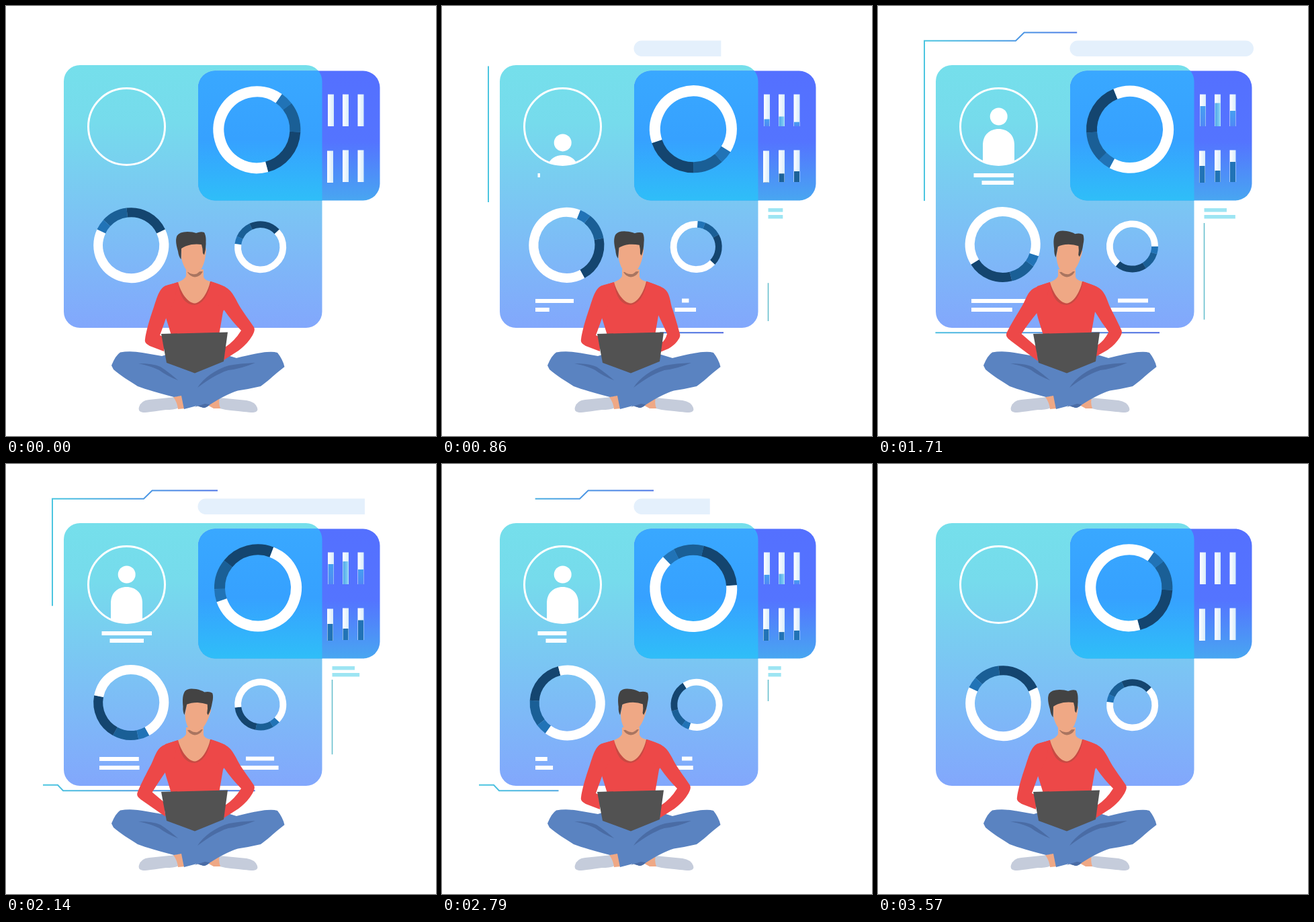
An HTML page that plays this animation: 640x640 px, repeating every 3640 ms.

```html
<!DOCTYPE html>
<html lang="en">
<head>
<meta charset="utf-8">
<title>Dashboard</title>
<style>
html, body { margin: 0; width: 100%; height: 100%; overflow: hidden; background: #fff; }
svg { display: block; width: 100vw; height: 100vh; }
.line { fill: none; stroke-width: 2; }
</style>
</head>
<body>
<svg id="stage" viewBox="0 0 640 640">
  <defs>
    <linearGradient id="panelFill" x2="0" y2="1">
      <stop offset="0" stop-color="#75dfeb"/><stop offset=".22" stop-color="#76dbec"/>
      <stop offset=".62" stop-color="#7cc0f5"/><stop offset="1" stop-color="#82a7fc"/>
    </linearGradient>
    <linearGradient id="cardFill" x2="0" y2="1">
      <stop offset="0" stop-color="#5470ff"/><stop offset=".55" stop-color="#5474ff"/>
      <stop offset="1" stop-color="#48a6f1"/>
    </linearGradient>
    <linearGradient id="overlapFill" x2="0" y2="1">
      <stop offset="0" stop-color="#39a8ff"/><stop offset=".53" stop-color="#36a1ff"/>
      <stop offset="1" stop-color="#2fbef8"/>
    </linearGradient>
    <linearGradient id="barFill">
      <stop offset="0" stop-color="#fff"/><stop offset="1" stop-color="#d6ebfb"/>
    </linearGradient>
    <linearGradient id="blueFill" x2="0" y2="1">
      <stop offset="0" stop-color="#459ff0"/><stop offset="1" stop-color="#5088f6"/>
    </linearGradient>
    <linearGradient id="cyanFill">
      <stop offset="0" stop-color="#4fa5ea"/><stop offset="1" stop-color="#88d3f4"/>
    </linearGradient>
    <linearGradient id="topStroke" gradientUnits="userSpaceOnUse" x1="68" x2="315">
      <stop offset="0" stop-color="#4cc6e0"/><stop offset="1" stop-color="#4b74e6"/>
    </linearGradient>
    <linearGradient id="lowStroke" gradientUnits="userSpaceOnUse" x1="55" x2="419">
      <stop offset="0" stop-color="#4cc6e0"/><stop offset="1" stop-color="#4b66e0"/>
    </linearGradient>
    <clipPath id="panelClip"><rect x="86" y="88" width="384.5" height="391" rx="24"/></clipPath>
    <clipPath id="avatarClip"><circle cx="179.5" cy="179.5" r="57"/></clipPath>
    <clipPath id="pillClip"><rect id="pillEdge" x="285" y="50" height="27"/></clipPath>
  </defs>

  <rect x="285.5" y="51.5" width="273.5" height="23.5" rx="11.7" fill="#e4f0fc" clip-path="url(#pillClip)"/>
  <rect x="86" y="88" width="384.5" height="391" rx="24" fill="url(#panelFill)"/>
  <rect x="286" y="96.5" width="270.5" height="193" rx="25" fill="url(#cardFill)"/>
  <rect x="286" y="96.5" width="270.5" height="193" rx="25" fill="url(#overlapFill)" clip-path="url(#panelClip)"/>

  <g clip-path="url(#avatarClip)">
    <g id="avatar" fill="#fff">
      <circle cx="179.7" cy="164.5" r="13"/>
      <path d="M156 240V207C156 192 166 183 179.5 183S203 192 203 207V240Z"/>
    </g>
  </g>
  <circle cx="179.5" cy="179.5" r="57" fill="none" stroke="#fff" stroke-width="3"/>

  <g id="charts"></g>
  <path id="topLine" class="line" pathLength="1" stroke="url(#topStroke)" d="M69 292V51.7H205L217.500 39.500H315"/>
  <path id="lowLine" class="line" pathLength="1" stroke="url(#lowStroke)" d="M419 486.300H85L77 477.800H55"/>
  <path id="sideLine" class="line" pathLength="1" stroke="#5ab9c9" style="stroke-width:1.4" d="M485.500 469V321"/>

  <g id="person">
    <path fill="#c5ccdb" d="M252 582L257 598Q250 601 238 601C222 603 211 605 204 605Q196 604 198 597Q201 587 213 586Z"/>
    <path fill="#c5ccdb" d="M317 583L314 598Q325 601 335 602C350 603 360 605 368 605Q376 604 374 598Q371 589 358 587Z"/>
    <path fill="#efa885" d="M249 582L262 579L266 599L256 600Q255 590 249 582ZM300 594L318 583Q316 591 319 599L309 599Z"/>
    <path fill="#5a83c1" d="M157 535Q163 520 170 515.500Q185 513 203 516L232 521L245 517H320L343 524Q375 516 388 515Q398 514 404 516Q412 526 414.500 537L407 543C398 550 388 560 379 566Q362 570 345 572.500C333 576 318 584 304 593Q299 598 294 598L284 595L265 600L261 580L250 582Q215 573 196 566C184 558 170 550 160 541Z"/>
    <path fill="#4a6ca5" d="M197 532Q219 532 230 537Q241 544 256 557Q240 551 228 542Q216 536 197 532ZM371 531Q347 532 332 535C311 541 294 554 285 568C300 557 315 547 331 542Q350 540 371 531ZM281 597L296 592L303 593Q298 598 294 598L284 595Z"/>
    <path fill="#ed4848" d="M256 411L237 417L232 440L238 464L246 490H317L323 455L332 435L326 418L305 410Z"/>
    <path id="leftArm" fill="#ed4848"/>
    <path id="rightArm" fill="#ed4848"/>
    <path fill="#c84a43" d="M256 411Q260 445 281 445Q299 442 305 410Z"/>
    <path fill="#efa885" d="M268 392V402Q266 407 256 411C260 426 270 442 281 442.500C291 442 301 425 304 410Q295 408 294 403V392Z"/>
    <path fill="#a97560" d="M270 396Q274 403 281 403.500Q289 403 293 395Z"/>
    <g id="head">
      <path fill="#efa885" d="M261 356V375C263 385 268 395 274 398Q279 400 284 398.500C293 393 297 378 298 362L292 350Z"/>
      <path fill="#434343" d="M260.500 377Q257 373 256 365C253 355 252 348 254.500 342Q258 336 270 336Q278 336 283 338Q290 335 295 337Q298 342 297.500 351Q298 362 295 370.500L293 368Q293 361 291 355Q284 354 276 355Q266 357 261 361Z"/>
    </g>
    <path fill="#525252" d="M231 488L330 485.500L324 529L281 546.500L239 531Z"/>
  </g>
</svg>
<script>
const LOOP = 3640, STEP = 71.4, TURN = 50;
const $ = id => document.getElementById(id);
const charts = $('charts');

function add(parent, tag, attrs) {
  const el = document.createElementNS('http://www.w3.org/2000/svg', tag);
  for (const name in attrs) el.setAttribute(name, attrs[name]);
  return parent.appendChild(el);
}

const clamp = u => Math.min(1, Math.max(0, u));
const ease = u => { u = clamp(u); return u * u * (3 - 2 * u); };
const ramp = (k, a, b) => ease((k - a) / (b - a));
// Rises over a..b, falls over c..d
const wave = (k, [a, b, c, d]) => ramp(k, a, b) - ramp(k, c, d);
const mix = (a, b, v) => a + (b - a) * v;

// pivot, drift of the centre, radius, width, first angle
const rings = [
  [374.2, 184.1, -.8, .2, 57, 16, -55],
  [186, 355.6, .2, .6, 49, 14, 205],
  [378.6, 358.3, .1, .4, 33.6, 9.8, 187]
].map(([x, y, dx, dy, r, w, first]) => {
  const g = add(charts, 'g');
  let angle = first;
  [[17.5, '#2173b6'], [40.5, '#1a5f96'], [72, '#14456f'], [230, '#fff']].forEach(([size, color]) => {
    add(g, 'circle', {
      r, cx: dx, cy: dy, fill: 'none', stroke: color, 'stroke-width': w, pathLength: 360,
      'stroke-dasharray': `${size} ${360 - size}`, transform: `rotate(${angle} ${dx} ${dy})`
    });
    angle += size;
  });
  return { g, x, y };
});

// x, bottom, fill height, timing, fill
const bars = [
  [479, 179, 30, [6, 21, 30, 47.3], 'url(#blueFill)'],
  [501, 179, 35, [1.2, 25.6, 28, 48.4], 'url(#cyanFill)'],
  [523.5, 179, 23, [7, 21.5, 28, 44.5], 'url(#blueFill)'],
  [478, 263, 25, [11, 24, 33, 49]],
  [501, 262, 17, [2, 17, 33, 49.5]],
  [523.5, 262, 30, [0, 23, 28.5, 48.7]]
].map(([x, bottom, size, time, fill]) => {
  add(charts, 'rect', { x, y: bottom - 47.5, width: 9, height: 47.5, fill: 'url(#barFill)' });
  const el = add(charts, 'rect', { x: x + .5, width: 8, fill: fill || '#1c6299' });
  return { el, bottom, size, time, tinted: !fill };
});

// x, y, longest width, sweep width, timing, colour
const pale = '#9de5f3';
const rows = [
  [139, 436, 88, 88, [0, 20, 19.3, 47]],
  [139, 449, 61, 61, [3.75, 24.8, 28.2, 47.9]],
  [357, 435.5, 45, 45, [7, 23, 26.9, 46.9]],
  [346.5, 449, 65.5, 65.5, [0, 24.6, 25.2, 50]],
  [142.5, 249, 74.5, 74.5, [9.3, 30, 30, 50]],
  [154.5, 260, 50.5, 62.5, [9.3, 30, 30, 50], '#fff', 12],
  [485.5, 301, 33.5, 47.5, [-1, 26.5, 23.4, 51], pale],
  [485.5, 311, 47.5, 47.5, [-1, 26.5, 23.4, 51], pale]
].map(([x, y, max, sweep, time, fill = '#fff', lag = 0]) => ({
  el: add(charts, 'rect', { x, y, height: fill === pale ? 5.5 : 6, fill }),
  max, sweep: sweep + lag, time, lag
}));

const lines = [
  ['topLine', 0, 27.2, 23, 50.2],
  ['lowLine', 3.7, 28.7, 24.7, 48],
  ['sideLine', 2.1, 25.6, 22.2, 46.2]
];

const arms = {
  leftArm: [
    'M256 411C246 414 240 415 236 417C226 423 223 441 217 457C212 472 208 487 207 496C206 501 209 503 214 506L235 514L235 493L229 490Q231 485 238 465L250 440Z',
    'M256 411C246 414 238 417 232 420C222 425 220 438 212 450C204 463 196 476 191 486C189 491 192 494 197 498L238 529L236 508L213 488Q222 474 237 456L250 440Z',
    [16, 25, 25, 39]],
  rightArm: [
    'M305 410C314 413 321 415 326 418C338 424 343 440 349 449C356 460 364 470 369 478C371 482 369 486 367 490C361 500 354 507 346 513L324 527L326 508Q340 499 350 483Q336 469 325 453L310 440Z',
    'M305 410C314 413 322 416 328 419C340 425 339 440 343 451C347 463 351 477 354 488C355 492 353 495 350 499C346 504 342 507 337 510L325 515L327 501Q332 498 335 488Q329 475 322 460L310 440Z',
    [0, 12.5, 17, 30]]
};

function morph(from, to, v) {
  const ends = to.match(/[\d.]+/g);
  let i = 0;
  return from.replace(/[\d.]+/g, n => mix(+n, +ends[i++], v).toFixed(2));
}

function draw(k) {
  for (const { g, x, y } of rings) {
    g.setAttribute('transform', `translate(${x} ${y}) rotate(${k * 360 / TURN})`);
  }
  const tint = clamp((k - 17) / 7);
  const [r, g, b] = [[28, 33], [98, 115], [153, 182]].map(([from, to]) => Math.round(mix(from, to, tint)));
  for (const { el, bottom, size, time, tinted } of bars) {
    const h = Math.max(0, size * wave(k, time));
    el.setAttribute('y', bottom - h);
    el.setAttribute('height', h);
    if (tinted) el.setAttribute('fill', `rgb(${r},${g},${b})`);
  }
  for (const { el, max, sweep, time, lag } of rows) {
    const w = k ? sweep * wave(k, time) - lag : 0;
    el.setAttribute('width', Math.min(max, Math.max(0, w)));
  }
  for (const [id, a, b, c, d] of lines) {
    const start = ramp(k, c, d), size = Math.max(0, ramp(k, a, b) - start);
    $(id).style.strokeDasharray = `0 ${start} ${size} 2`;
    $(id).style.visibility = size > 0 ? 'visible' : 'hidden';
  }
  for (const id in arms) {
    const [from, to, time] = arms[id];
    $(id).setAttribute('d', morph(from, to, wave(k, time)));
  }
  $('pillEdge').setAttribute('width', Math.max(0, 274.5 * wave(k, [.5, 24.3, 25.4, 49.8])));
  $('avatar').setAttribute('transform', `translate(0 ${90 * (1 - wave(k, [6, 17, 39, 50]))})`);
  $('head').setAttribute('transform', `rotate(${11.5 * wave(k, [0, 33, 36, 50])} 281 401)`);
}

const begin = performance.now();
function tick(now) {
  const t = Math.max(0, now - begin) % LOOP;
  draw(Math.floor((t + 5) / STEP) % TURN);
  requestAnimationFrame(tick);
}
draw(0);
requestAnimationFrame(tick);
</script>
</body>
</html>
```
